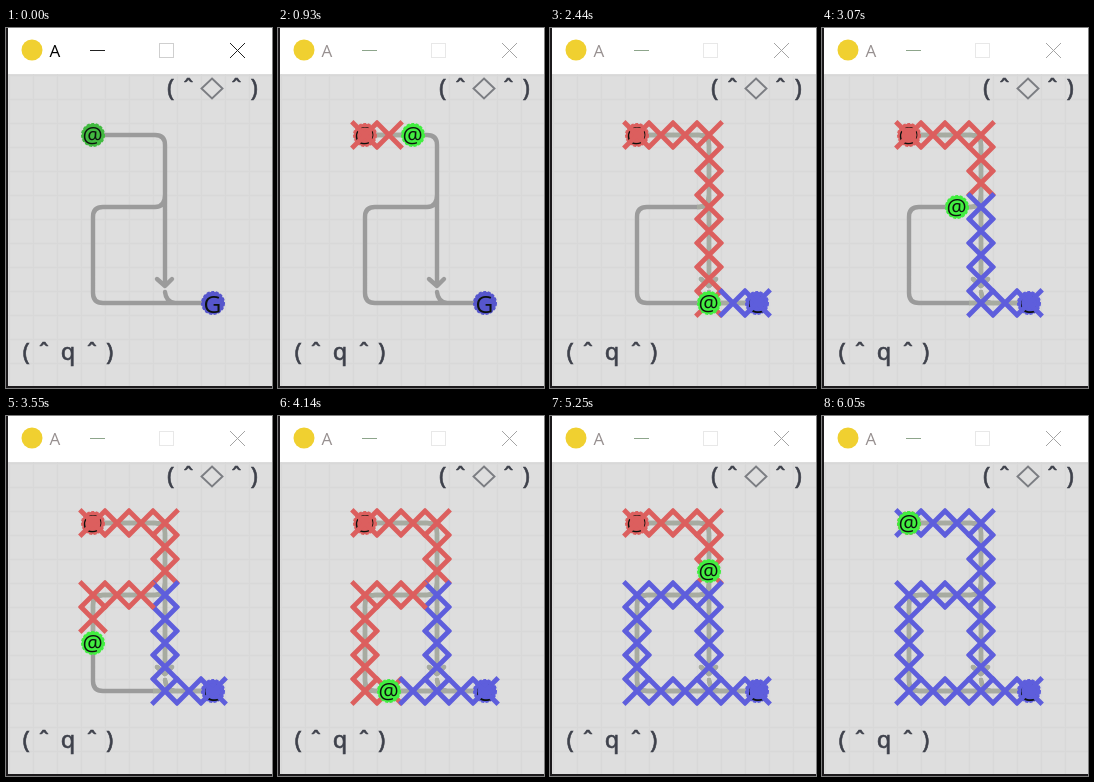
An HTML page for the animation above (7510 ms loop, 266 px wide and 360 px high).

```html
<!DOCTYPE html>
<html lang="en">
<head>
<meta charset="utf-8">
<title>A</title>
<style>
  html, body { margin: 0; width: 100%; height: 100%; overflow: hidden; background: #dedede; }
  svg { display: block; width: 266px; height: 360px; }
  text { text-anchor: middle; font-family: "Open Sans", "Noto Sans", sans-serif; }
  .face text {
    font: 24px "Noto Sans Mono", "DejaVu Sans Mono", monospace;
    fill: #3e414b; stroke: #3e414b; stroke-width: .6;
  }
  .route { fill: none; stroke-width: 4.4; stroke-linejoin: round; stroke-linecap: round; }
  .cross { fill: none; stroke-width: 4.8; }
  .rim { stroke-width: 1.6; stroke-dasharray: 3 1.6; }
</style>
</head>
<body>
<svg viewBox="0 0 266 360">
  <defs>
    <pattern id="grid" x="2" y="46" width="24" height="24" patternUnits="userSpaceOnUse">
      <path d="M0 1.500H24M1.500 0V24" stroke="#d8d8d8" stroke-width="1.6" fill="none"/>
    </pattern>
    <path id="line" d="M87 107H149Q159 107 159 117V257M151 251L159 258L166 251
      M159 167Q159 179 149 179H97Q87 179 87 189V265Q87 275 97 275H207M159 264Q160 274 169 275"/>
    <clipPath id="seen"><path id="seenArea"/></clipPath>
  </defs>

  <rect width="266" height="360" fill="#dedede"/>
  <rect y="46" width="266" height="314" fill="url(#grid)"/>
  <rect width="266" height="46" fill="#fff"/>
  <path d="M0 0H2V358H266V360H0Z" fill="#1c1a1c"/>

  <circle cx="26" cy="22" r="10.5" fill="#f0d030"/>
  <text id="title" x="49" y="29" font-size="17">A</text>
  <path id="minimise" d="M84 22.5H99"/>
  <rect id="maximise" x="153.5" y="15.5" width="14" height="14" fill="none"/>
  <path id="close" d="M224 15L239 30M239 15L224 30"/>

  <g class="face" id="topFace"></g>
  <path d="M206 50.500L216.500 60.500L206 70.500L195.500 60.500Z" fill="none" stroke="#7b7d82" stroke-width="1.9"/>
  <g class="face" id="lowFace"></g>

  <use href="#line" class="route" stroke="#9b9b9b"/>
  <g clip-path="url(#seen)"><use href="#line" class="route" stroke="#a7aba1"/></g>

  <g id="start"></g>
  <g id="goal"></g>
  <g id="crosses"></g>
  <g id="walker"></g>
</svg>
<script>
  const CELL = 24, ARM = 13.2, LOOP = 7510;
  const RED = '#dc5f5e', BLUE = '#5e5edc', GREEN = '#42ba40', BRIGHT = '#42ee40';
  const TIMES = [
    800, 910, 1030, 1150, 1270, 1390, 1500, 1630, 1790, 1860, 2030, 2100,
    2270, 2440, 2510, 2680, 2740, 2900,
    3070, 3140, 3310, 3380, 3550, 3670, 3790, 3910, 4070,
    4140, 4300, 4420, 4530, 4700, 4770, 4940, 5010, 5180, 5250, 5420,
    5590, 5710, 5820, 5940, 6050
  ];
  const MOVES = 'RRRDDDDDDDRR' + 'LLUUUU' + 'LLLDDDDRR' + 'LLUUUURRRUUULLL';
  const DIRS = { R: [1, 0], L: [-1, 0], D: [0, 1], U: [0, -1] };
  const GOAL_STOP = 12;
  const isForward = i => i < GOAL_STOP || (i >= 18 && i < 27);
  const $ = id => document.getElementById(id);

  const stops = [[87, 107]];
  for (const m of MOVES) {
    const [x, y] = stops[stops.length - 1], [dx, dy] = DIRS[m];
    stops.push([x + dx * CELL, y + dy * CELL]);
  }

  const circle = (x, y, r, color, extra = '') =>
    `<circle cx="${x}" cy="${y}" r="${r}" fill="${color}" ${extra}/>`;
  const token = ([x, y], color, char, size, drop) =>
    circle(x, y, 11.2, color, `stroke="${color}" class="rim"`) +
    `<text x="${x - .5}" y="${y + drop}" font-size="${size}" fill="#0c120e">${char}</text>`;
  const at = (pos, color) => token(pos, color, '@', 22.5, 7.5);
  const cover = ([x, y], color) => circle(x, y, 7.6, color);
  const cross = ([x, y], color) =>
    `<path class="cross" stroke="${color}" d="M${x - ARM} ${y - ARM}l${2 * ARM} ${2 * ARM}m0 ${-2 * ARM}l${-2 * ARM} ${2 * ARM}"/>`;
  const face = (x, y, mouth) => [['(', -42], ['ˆ', -24], [mouth, 0], ['ˆ', 24], [')', 42]]
    .map(([c, dx]) => `<text x="${x + dx}" y="${y}">${c}</text>`).join('');

  $('topFace').innerHTML = face(206.5, 68, '');
  $('lowFace').innerHTML = face(62, 331.5, 'q');

  // Cells left for the first time going forward turn red; any later exit turns them blue.
  function marksAfter(count) {
    const marks = new Map();
    const mark = (pos, color) => {
      const key = pos.join();
      marks.delete(key);
      marks.set(key, { pos, color });
    };
    for (let i = 0; i < Math.min(count, MOVES.length); i++) {
      const fresh = isForward(i) && !marks.has(stops[i].join());
      mark(stops[i], fresh ? RED : BLUE);
    }
    if (count > MOVES.length) mark(stops[MOVES.length], BLUE);
    return [...marks.values()];
  }

  let shown = -1;
  function draw(time) {
    const count = TIMES.filter(t => t <= time).length;
    if (count === shown) return;
    shown = count;
    const moved = count > 0;
    const marks = marksAfter(count);
    const goal = stops[GOAL_STOP];
    $('title').setAttribute('fill', moved ? '#979090' : '#000');
    $('minimise').setAttribute('stroke', moved ? '#8da58b' : '#222');
    $('maximise').setAttribute('stroke', moved ? '#e8e8e8' : '#cfcfcf');
    $('close').setAttribute('stroke', moved ? '#a4a4a4' : '#222');
    $('start').innerHTML = at(stops[0], moved ? RED : GREEN) + (moved ? cover(stops[0], RED) : '');
    $('goal').innerHTML = token(goal, count > GOAL_STOP ? BLUE : '#5656cc', 'G', 24.5, 10) +
      (count > GOAL_STOP ? cover(goal, BLUE) : '');
    $('seenArea').setAttribute('d',
      marks.map(({ pos: [x, y] }) => `M${x - 12} ${y - 12}h24v24h-24z`).join('') || 'M0 0');
    $('crosses').innerHTML = marks.map(m => cross(m.pos, m.color)).join('');
    $('walker').innerHTML = moved ? at(stops[Math.min(count, MOVES.length)], BRIGHT) : '';
  }

  const begin = performance.now();
  function tick() {
    draw((performance.now() - begin) % LOOP);
    requestAnimationFrame(tick);
  }
  tick();
</script>
</body>
</html>
```
